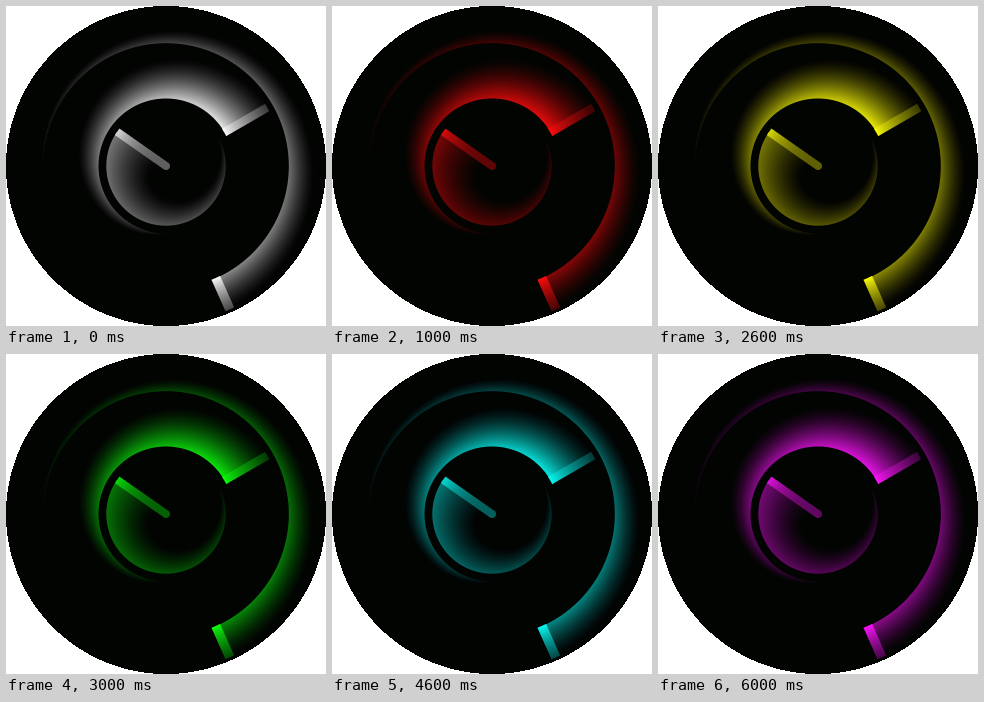
Animation, 320 px wide and 320 px high, one loop 7 s. Source, as an HTML page with a canvas:

```html
<!DOCTYPE html>
<html lang="en">
<head>
<meta charset="utf-8">
<title>Glowing clock</title>
<style>
  html, body {
    margin: 0;
    width: 100%;
    height: 100%;
    overflow: hidden;
    background: #fff;
  }
  .dial {
    position: absolute;
    left: 0;
    top: 0;
    width: 320px;
    height: 320px;
    isolation: isolate;
  }
  .dial > * { position: absolute; inset: 0; }
  .tint {
    mix-blend-mode: multiply;
    animation: hue 7s step-end infinite;
  }
  /* Lifts black slightly and whitens the corners */
  .rim {
    mix-blend-mode: lighten;
    background: radial-gradient(circle, #020402 160px, #fff 160px);
  }
  @keyframes hue {
    0%       { background: #fff; }
    14.2857% { background: #ff0c0c; }
    28.5714% { background: #ffff08; }
    42.8571% { background: #0cff0c; }
    57.1429% { background: #08fff8; }
    71.4286% { background: #1c14ff; }
    85.7143% { background: #ff14ff; }
    100%     { background: #fff; }
  }
</style>
</head>
<body>
<div class="dial">
  <canvas id="face" width="320" height="320"></canvas>
  <div class="tint"></div>
  <div class="rim"></div>
</div>
<script>
  const SIZE = 320, C = SIZE / 2, RAD = Math.PI / 180;

  // edge: radius where the glow starts; dir: +1 spreads outward, -1 inward
  // reach: glow depth at the hand; sweep: degrees until the glow dies out
  const rings = [
    { angle: 156, edge: 122.8, dir: 1, reach: 36, sweep: 255, peak: 140, fade: 0.8,
      inner: 122.5, outer: 157, width: 9.5, bright: 255, dim: 70 },
    { angle: 60, edge: 67.5, dir: 1, reach: 54, sweep: 245, peak: 235, fade: 0.8,
      inner: 67.2, outer: 117, width: 8.5, bright: 255, dim: 55 },
    { angle: 305, edge: 59.7, dir: -1, reach: 60, sweep: 245, peak: 120, fade: 0.45,
      inner: 0, outer: 59.7, width: 8, bright: 95, dim: 215 }
  ];

  const clamp = v => Math.min(1, Math.max(0, v));

  // Crescent that gets thinner and dimmer counterclockwise from the hand
  function glow(ring, r, theta) {
    const behind = (ring.angle - theta + 720) % 360;
    const left = 1 - behind / ring.sweep;
    const depth = (r - ring.edge) * ring.dir;
    if (left <= 0 || depth < -0.5) return 0;
    const falloff = clamp(1 - Math.max(0, depth) / (ring.reach * left)) ** 1.5;
    return ring.peak * left ** ring.fade * falloff * clamp(depth + 0.5);
  }

  function hand(ring, x, y, r) {
    const s = Math.sin(ring.angle * RAD), c = Math.cos(ring.angle * RAD);
    const along = x * s - y * c;
    const across = along > 0 ? Math.abs(x * c + y * s) : r;
    const cover = clamp(ring.width / 2 - across + 0.5) *
      clamp(r - ring.inner + 0.5) * clamp(ring.outer - r + 0.5);
    const f = clamp((r - ring.inner) / (ring.outer - ring.inner));
    const t = ring.dir > 0 ? f ** 0.8 : f ** 2.5;
    return { cover, shade: ring.bright + (ring.dim - ring.bright) * t };
  }

  const ctx = document.getElementById('face').getContext('2d');
  const img = ctx.createImageData(SIZE, SIZE);
  for (let i = 0; i < SIZE * SIZE; i++) {
    const x = i % SIZE + 0.5 - C, y = Math.floor(i / SIZE) + 0.5 - C;
    const r = Math.hypot(x, y), theta = Math.atan2(x, -y) / RAD;
    let v = 0;
    for (const ring of rings) v = Math.max(v, glow(ring, r, theta));
    for (const ring of rings) {
      const { cover, shade } = hand(ring, x, y, r);
      v += (shade - v) * cover;
    }
    img.data.set([v, v, v, 255], i * 4);
  }
  ctx.putImageData(img, 0, 0);
</script>
</body>
</html>
```
